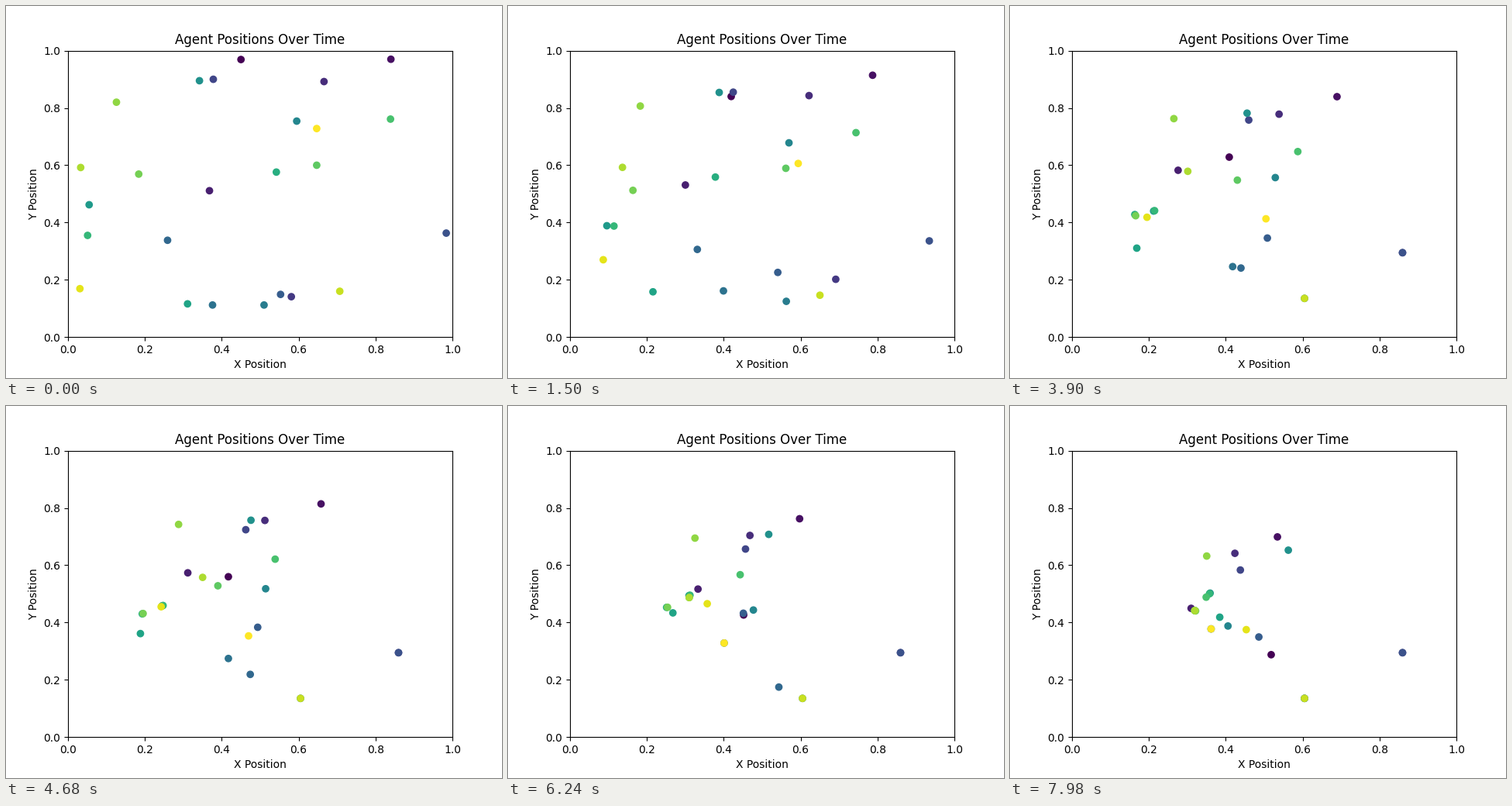
A matplotlib script for the animation above (8000 ms loop, 640 by 480 pixels).

```python
import numpy as np
import matplotlib.pyplot as plt
from matplotlib.animation import FuncAnimation

INTERVAL = 20   # ms per drawn frame
HOLD = 3        # drawn frames per simulation step
FRAMES = 400
STEPS = (FRAMES - 1) // HOLD

# Key values of the pursuit: start points, whom each agent chases, and how far
# it moves per step (thousandths of the axes). All motion follows from these.
START = [
    (.450, .969), (.840, .970), (.368, .511), (.666, .892), (.581, .141),
    (.378, .900), (.984, .363), (.553, .149), (.259, .338), (.376, .112),
    (.510, .112), (.595, .754), (.342, .895), (.055, .462), (.311, .116),
    (.542, .576), (.051, .355), (.839, .761), (.647, .600), (.184, .569),
    (.126, .820), (.033, .592), (.707, .160), (.031, .169), (.647, .728),
]
PREY = [8, 15, 21, 2, 6, 24, 4, 0, 22, 18, 22, 9, 6,
        16, 23, 19, 17, 15, 19, 23, 11, 18, 10, 0, 9]
SPEED = [5.31, 3.08, 2.83, 2.64, 5.04, 2.61, 2.25, 3.11, 3.16, 2.18, 2.17, 3.20, 2.47,
         3.71, 4.21, 6.60, 2.85, 4.25, 3.45, 2.41, 2.34, 4.14, 2.34, 4.61, 5.32]


def step(pos):
    """Move the agents in turn straight at their prey, never past it."""
    pos = pos.copy()
    for i, (prey, speed) in enumerate(zip(PREY, SPEED)):
        gap = pos[prey] - pos[i]
        dist = np.hypot(*gap)
        if dist > 0:
            pos[i] += gap * min(1, speed / 1000 / dist)
    return pos


path = [np.array(START)]
for _ in range(STEPS):
    path.append(step(path[-1]))

fig, ax = plt.subplots(figsize=(6.4, 4.8), dpi=100)
dots = ax.scatter(*path[0].T, c=range(len(START)), cmap="viridis")
ax.set(xlim=(0, 1), ylim=(0, 1), xlabel="X Position", ylabel="Y Position",
       title="Agent Positions Over Time")


def update(frame):
    dots.set_offsets(path[frame // HOLD])
    return dots,


anim = FuncAnimation(fig, update, frames=FRAMES, interval=INTERVAL,
                     repeat=True, repeat_delay=0, blit=True)
plt.show()
```
